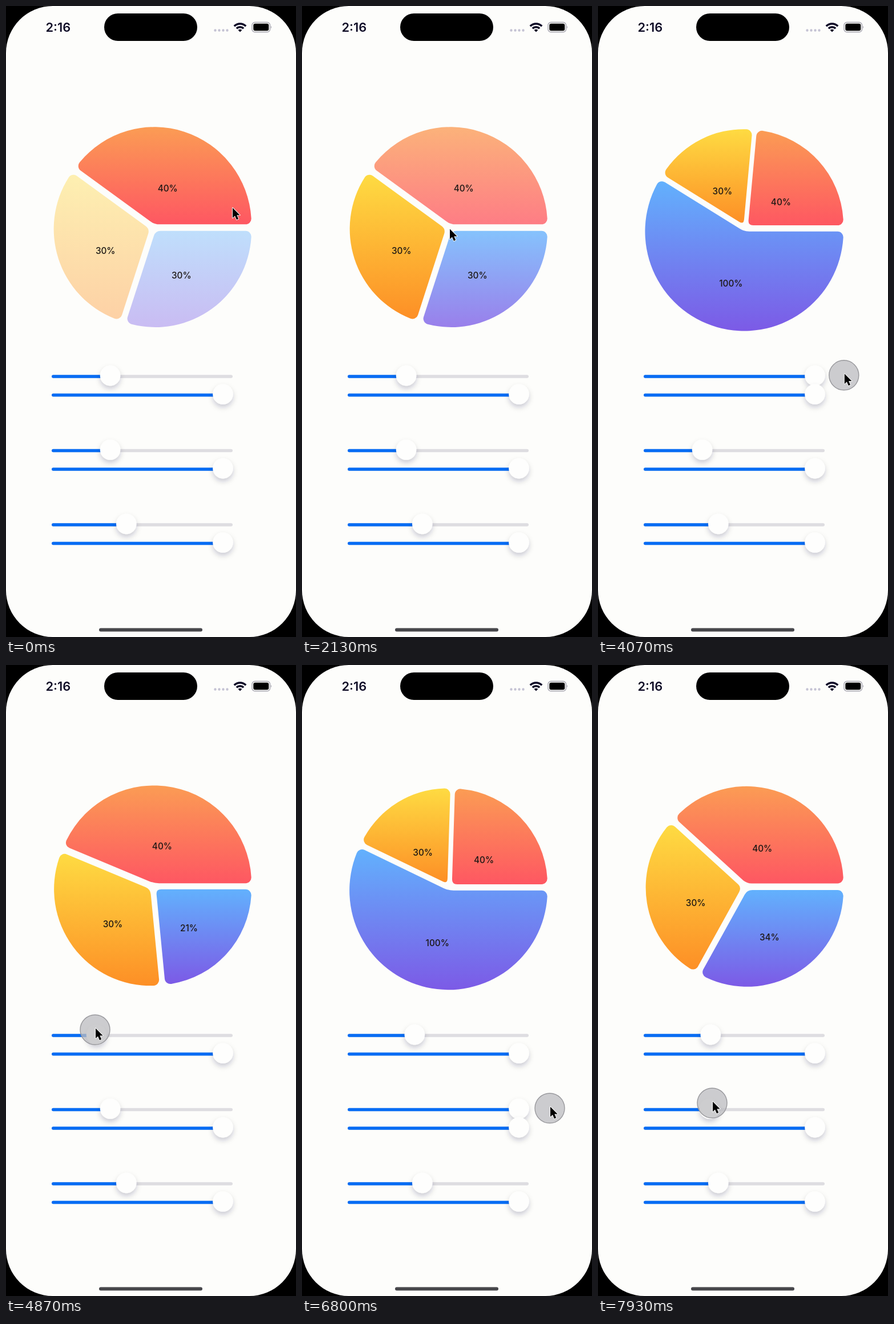
Animation of 508 by 1102 pixels, one loop 8000 ms. Source, as an HTML page:

```html
<!DOCTYPE html>
<html lang="en">
<head>
<meta charset="utf-8">
<title>Pie chart with sliders</title>
<style>
  html, body { margin: 0; width: 100%; height: 100%; overflow: hidden; background: #000; }
  svg { display: block; width: 100%; height: 100%; }
  text { font-family: Inter, Roboto, sans-serif; }
  .label { font-size: 15.3px; font-weight: 500; text-anchor: middle; fill: #1c1714; }
</style>
</head>
<body>
<svg id="stage" viewBox="0 0 508 1102">
  <defs>
    <linearGradient id="blue" x2="0" y2="1">
      <stop offset="0" stop-color="#62b1fd"/><stop offset="1" stop-color="#7c5ae6"/>
    </linearGradient>
    <linearGradient id="yellow" x2="0" y2="1">
      <stop offset="0" stop-color="#fedb42"/><stop offset="1" stop-color="#fd8f26"/>
    </linearGradient>
    <linearGradient id="red" x2="0" y2="1">
      <stop offset="0" stop-color="#fb9c54"/><stop offset="1" stop-color="#fe5762"/>
    </linearGradient>
    <filter id="shadow" x="-60%" y="-60%" width="220%" height="240%">
      <feDropShadow dx="0" dy="5" stdDeviation="5" flood-color="#101030" flood-opacity=".2"/>
    </filter>
  </defs>

  <rect width="508" height="1102" fill="#000"/>
  <rect width="508" height="1102" rx="82" fill="#fdfdfb"/>

  <text x="69.5" y="45" font-size="21.8" font-weight="600" fill="#0e0b26">2:16</text>
  <rect x="172" y="13" width="163" height="48" rx="24" fill="#000"/>
  <path d="M366.5 42.5h22" stroke="#c5c3d4" stroke-width="4.4" stroke-linecap="round" stroke-dasharray="0 7"/>
  <g fill="none" stroke="#0e0b26" stroke-width="3.5">
    <path d="M399.8 35.3a14.4 14.4 0 0 1 20.4 0M403.8 39.3a8.8 8.8 0 0 1 12.4 0"/>
    <path d="M410 45.5l-3.4-3.4a4.8 4.8 0 0 1 6.8 0z" fill="#0e0b26" stroke="none"/>
  </g>
  <rect x="431" y="28.5" width="31.5" height="17" rx="5" fill="none" stroke="#a5a4ae" stroke-width="1.4"/>
  <rect x="433.3" y="30.8" width="27" height="12.4" rx="3.2" fill="#000"/>
  <path d="M464 34.5q2.2 2.5 0 5z" fill="#a5a4ae"/>
  <rect x="163" y="1086.5" width="181" height="6" rx="3" fill="#47474b"/>

  <g id="pie"></g>
  <g id="sliders"></g>
  <circle id="touch" r="26" fill="#bebec2" fill-opacity=".76" stroke="#98989c" stroke-width="1.4"/>
  <path id="cursor" d="M0 0V17.6L4 13.9L7 20.7L10.2 19.3L7.3 12.7H12.7Z"
        fill="#000" stroke="#fff" stroke-width="1.8" paint-order="stroke" stroke-linejoin="round"/>
</svg>

<script>
const LOOP = 8000, FRAME = 200 / 3;
const TAU = Math.PI * 2;
const COLORS = ['blue', 'yellow', 'red'];
const YELLOW_SHARE = 0.3, RED_SHARE = 0.4;

// time, x, y of the pointer
const POINTER = [
  [0, 396, 355], [250, 394, 358], [600, 332, 462], [850, 328, 466],
  [1250, 176, 440], [1750, 180, 438], [2133, 258, 392], [2500, 180, 646],
  [2667, 180, 646], [3267, 237.5, 646], [3400, 251, 646], [4000, 431, 645],
  [4340, 426, 643], [4730, 156, 637], [4867, 156, 637], [5200, 71, 640],
  [5330, 62, 641], [5790, 193, 642], [5933, 193, 642], [6020, 195.3, 643],
  [6230, 187, 772], [6340, 187, 773], [6800, 434, 774], [6850, 443, 774],
  [6933, 416, 772], [7400, 78, 766], [7790, 200, 765], [8000, 200, 765]
];
const PRESSES = [[530, 660], [1200, 1330], [1880, 2000], [2600, 6050], [6270, 8000]];
// Slider drags: first and last time, distance from pointer to knob centre
const DRAGS = [{ from: 2600, to: 6050, grab: 2.5 }, { from: 6270, to: LOOP, grab: -4.5 }];
// time, index of the highlighted slice (-1 for none)
const HIGHLIGHTS = [[-999, 2], [600, 0], [1250, 1], [1930, -1]];

const clamp = (v, lo, hi) => Math.min(hi, Math.max(lo, v));
const smooth = p => p * p * (3 - 2 * p);

function add(parent, tag, attrs) {
  const node = document.createElementNS('http://www.w3.org/2000/svg', tag);
  set(node, attrs);
  return parent.appendChild(node);
}
function set(node, attrs) {
  for (const key in attrs) node.setAttribute(key, attrs[key]);
}

// Monotone cubic interpolation through the pointer keys
function track(t, col) {
  const keys = POINTER, last = keys.length - 1;
  t = clamp(t, 0, LOOP);
  let i = 0;
  while (i < last - 1 && keys[i + 1][0] <= t) i++;
  const slope = k => k < 0 || k >= last ? 0 : (keys[k + 1][col] - keys[k][col]) / (keys[k + 1][0] - keys[k][0]);
  const tangent = k => {
    const a = slope(k - 1), b = slope(k);
    return a * b <= 0 ? 0 : 2 * a * b / (a + b);
  };
  const [t0, t1] = [keys[i][0], keys[i + 1][0]];
  const h = t1 - t0, u = (t - t0) / h, s = smooth(u);
  return keys[i][col] * (1 - s) + keys[i + 1][col] * s
    + h * u * (1 - u) * ((1 - u) * tangent(i) - u * tangent(i + 1));
}

// Sector pushed out along its bisector, with rounded corners
function sectorPath(start, end) {
  const half = (end - start) / 2, mid = start + half, push = 6.5, corner = 10;
  const radius = 172 - push * Math.cos(half);
  const ax = 258 + push * Math.cos(mid), ay = 387.5 + push * Math.sin(mid);
  const at = (r, a) => `${(ax + r * Math.cos(a)).toFixed(2)} ${(ay + r * Math.sin(a)).toFixed(2)}`;
  const inset = Math.asin(corner / (radius - corner));
  const edge = Math.sqrt((radius - corner) ** 2 - corner ** 2);
  const large = half - inset > Math.PI / 2 ? 1 : 0;
  const round = `A${corner} ${corner} 0 0 1 `;
  return `M${at(9, end)}Q${at(0, 0)} ${at(9, start)}L${at(edge, start)}`
    + round + at(radius, start + inset)
    + `A${radius} ${radius} 0 ${large} 1 ${at(radius, end - inset)}`
    + round + at(edge, end) + 'Z';
}

const pie = document.getElementById('pie');
const slices = COLORS.map(color => ({
  shape: add(pie, 'path', { fill: `url(#${color})` }),
  label: add(pie, 'text', { class: 'label' })
}));

const sliders = [[647, .3], [679.5, 1], [776.5, .3], [809, 1], [906, .4], [938.5, 1]].map(([y, value]) => {
  const g = document.getElementById('sliders');
  const bar = { x: 80, y: y - 2.8, height: 5.6, rx: 2.8 };
  add(g, 'rect', { ...bar, width: 317, fill: '#dedde1' });
  const fill = add(g, 'rect', { ...bar, fill: '#086df4' });
  const knob = add(g, 'circle', { cy: y - 1.5, r: 17.8, fill: '#fefefd', filter: 'url(#shadow)' });
  const show = v => {
    const x = 98 + 282 * v;
    set(fill, { width: x - 80 });
    set(knob, { cx: x });
  };
  show(value);
  return show;
});

const touch = document.getElementById('touch');
const cursor = document.getElementById('cursor');

function dragValue({ from, to, grab }, t) {
  if (t < from) return 0.3;
  return clamp((track(Math.min(t, to), 1) + grab - 98) / 282, 0, 1);
}

// Share of the blue slice: set by whichever slider was dragged last
const blueShare = t => dragValue(DRAGS[t < DRAGS[1].from ? 0 : 1], t);

function opacityOf(index, t) {
  const level = chosen => chosen < 0 || chosen === index ? 1 : 0.4;
  let k = 0;
  while (k + 1 < HIGHLIGHTS.length && HIGHLIGHTS[k + 1][0] <= t) k++;
  const [time, chosen] = HIGHLIGHTS[k];
  const before = level(HIGHLIGHTS[Math.max(0, k - 1)][1]);
  return before + (level(chosen) - before) * smooth(clamp((t - time) / 350, 0, 1));
}

// The label trails the knob by one step, the slices by two
function drawPie(t) {
  const shares = [blueShare(t - 2 * FRAME), YELLOW_SHARE, RED_SHARE];
  const shown = [blueShare(t - FRAME), YELLOW_SHARE, RED_SHARE];
  const total = shares.reduce((a, b) => a + b);
  let start = 0;
  shares.forEach((share, i) => {
    const end = start + share / total * TAU, mid = (start + end) / 2;
    const { shape, label } = slices[i];
    set(shape, {
      d: sectorPath(start, end),
      opacity: opacityOf(i, t),
      visibility: share < 0.04 ? 'hidden' : 'visible'
    });
    set(label, { x: 256.5 + 86.5 * Math.cos(mid), y: 406.5 + 86.5 * Math.sin(mid) });
    label.textContent = Math.floor(shown[i] * 100 + 1e-6) + '%';
    start = end;
  });
}

function draw(t) {
  sliders[0](dragValue(DRAGS[0], t));
  sliders[2](dragValue(DRAGS[1], t));
  drawPie(t);

  const x = track(t, 1), y = track(t, 2);
  const pressed = PRESSES.some(([from, to]) => t >= from && t < to);
  set(touch, { cx: x, cy: y, visibility: pressed ? 'visible' : 'hidden' });
  set(cursor, { transform: `translate(${x + 1} ${y - 2.5})` });
}

const origin = performance.now();
function tick() {
  const t = (performance.now() - origin) % LOOP;
  draw(Math.floor((t + 4) / FRAME) % 120 * FRAME);
  requestAnimationFrame(tick);
}
tick();
</script>
</body>
</html>
```
